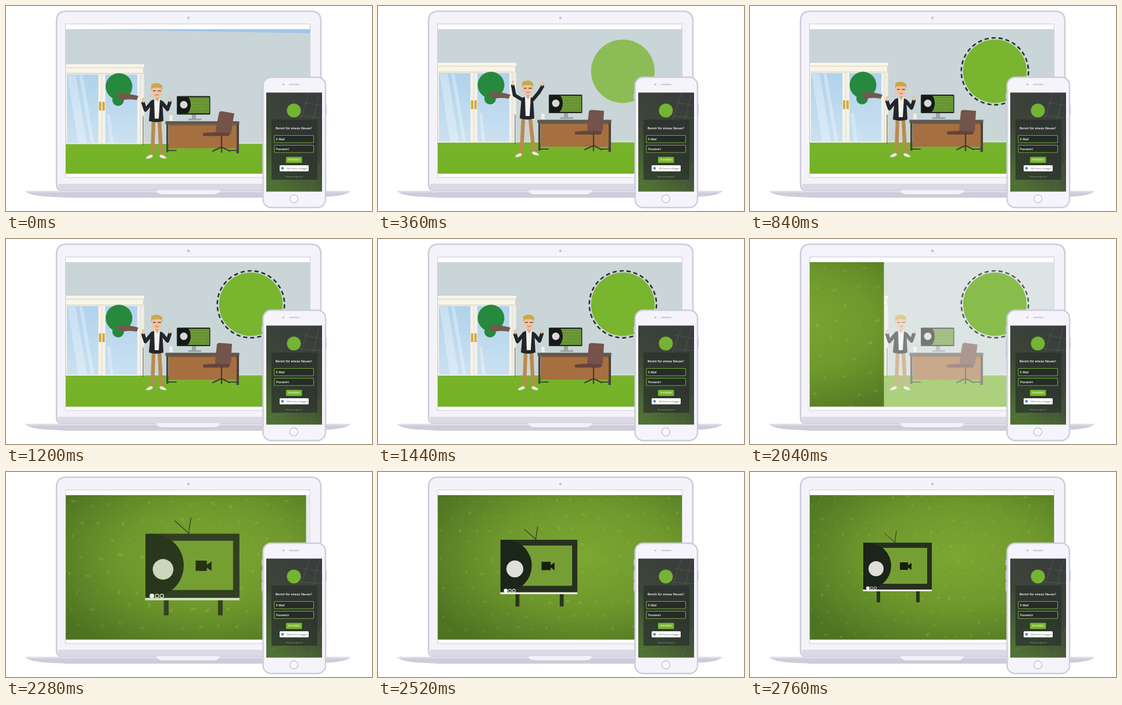
Recreate the animation shown at these times as an HTML page. Size 630 by 354 pixels, loop 2.88 s.

```html
<!DOCTYPE html>
<html lang="de">
<head>
<meta charset="utf-8">
<title>Laptop und Telefon</title>
<style>
html, body { margin: 0; width: 100%; height: 100%; overflow: hidden; background: #fff; }
svg { display: block; width: 630px; height: 354px; }
text { font-family: "Open Sans", "Noto Sans", sans-serif; fill: #fff; }
.line { fill: none; stroke-linecap: round; stroke-linejoin: round; }
</style>
</head>
<body>
<svg viewBox="0 0 630 354">
  <defs>
    <clipPath id="video"><rect x="103" y="40" width="420.5" height="249.5"/></clipPath>
    <clipPath id="tvScreen"><rect x="195" y="122" width="118" height="80"/></clipPath>
    <clipPath id="pcScreen"><rect x="296" y="155" width="54" height="28"/></clipPath>
    <clipPath id="phoneScreen"><rect x="448" y="149.5" width="96" height="171"/></clipPath>
    <radialGradient id="paper" cx=".6" cy=".42" r=".72">
      <stop offset="0" stop-color="#7da732"/><stop offset=".5" stop-color="#6e982c"/><stop offset="1" stop-color="#4e7423"/>
    </radialGradient>
    <linearGradient id="glass" x1="0" y1="0" x2="0" y2="1">
      <stop offset="0" stop-color="#b0d2ec"/><stop offset="1" stop-color="#cbe1f1"/>
    </linearGradient>
    <linearGradient id="floor" x1="0" y1="0" x2="0" y2="1">
      <stop offset="0" stop-color="#77b42b"/><stop offset="1" stop-color="#73b125"/>
    </linearGradient>
    <linearGradient id="photo" x1=".7" y1="0" x2=".3" y2="1">
      <stop offset="0" stop-color="#393d3c"/><stop offset=".5" stop-color="#3d4638"/><stop offset="1" stop-color="#4f7134"/>
    </linearGradient>
  </defs>

  <!-- laptop -->
  <path d="M87 26Q87 9 104 9H525Q542 9 542 26V308Q542 319 531 319H98Q87 319 87 308Z" fill="#f4f3f9" stroke="#cecbdb" stroke-width="2.6"/>
  <circle cx="314" cy="20.5" r="2.2" fill="#c4c1d0"/>
  <rect x="102.5" y="31" width="421" height="265" fill="#fff" stroke="#cbc9d6"/>
  <path d="M90 307H540V318H90Z" fill="#dbd9e4"/>
  <path d="M34 320H592Q586 327 558 329L520 331H106L68 329Q40 327 34 320Z" fill="#cecbdb"/>
  <path d="M34 319H592V322H34Z" fill="#dfdde8"/>
  <path d="M259 318H368Q367 325 358 325H269Q260 325 259 318Z" fill="#f3f2f8"/>

  <g clip-path="url(#video)">
    <rect x="103" y="40" width="421" height="250" fill="#c9d5d7"/>
    <path id="strip" fill="#9fc6ea" d="M103 40H524V47L240 42Z"/>
    <g id="scene">
      <path d="M238 233H524V236H238Z" fill="#d6e0e0"/>
      <rect x="103" y="235.500" width="421" height="55" fill="url(#floor)"/>

      <!-- glass doors -->
      <path d="M103 113H238V236H103Z" fill="#efeee6"/>
      <path d="M105 116H159V234H105ZM171 116H226V234H171Z" fill="url(#glass)"/>
      <path d="M106 117H120L139 234H124ZM126 117H132L152 234H146ZM174 185H179L185 234H179Z" fill="#fff" opacity=".3"/>
      <path d="M159 116H171V235H159ZM226 116H231V235H226Z" fill="#f5f2e8"/>
      <path d="M165 116V235M231 116V235M238 113V236" class="line" stroke="#d5d3c8" stroke-width=".8"/>
      <path d="M101 98H238V104H236V113H101Z" fill="#f8f5e8"/>
      <path d="M103 104H236M103 114H238" class="line" stroke="#d9d3b8"/>
      <path d="M160 163H164V178H160ZM166 163H170V178H166Z" fill="#d6aa43"/>
      <circle cx="194.500" cy="136.500" r="23" fill="#26893d"/>
      <circle cx="193" cy="160" r="10" fill="#26893d"/>
      <path d="M190 150Q207 147 228 153L225 160Q208 157 198 161Z" fill="#75584a"/>

      <!-- desk -->
      <path d="M276 201H279.500V250H276ZM396.500 201H401V252H396.500Z" fill="#49443e"/>
      <path d="M280 202H397V243H280Z" fill="#a66f3f"/>
      <path d="M280 202H397V204H280Z" fill="#855938"/>
      <path d="M274.500 196.500H401.500V202H274.500Z" fill="#5d5850"/>
      <path d="M277 247H293M384 247H398" class="line" stroke="#49443e" stroke-width="2"/>
      <rect x="281" y="186" width="6.500" height="9.500" rx="1" fill="#eef0ec"/>
      <path d="M287 188Q291 190 287 193" class="line" stroke="#b9bfbd"/>
      <path d="M320 184H327V192H336V195H314V192H320Z" fill="#9ba3a4"/>
      <rect x="294" y="153" width="57.500" height="32" rx="1.500" fill="#20251f"/>
      <g clip-path="url(#pcScreen)">
        <path d="M296 155H350V183H296Z" fill="#669434"/>
        <path d="M319 160H346M317 165H348M320 170H344M318 175H347" stroke="#7ba33e" stroke-width="1.400" stroke-dasharray="3 2"/>
        <circle cx="294" cy="168" r="24" fill="#151a16"/>
        <circle cx="306" cy="168" r="6.500" fill="#d5d8d4"/>
      </g>

      <!-- chair -->
      <path id="chair" d="M363 182Q364 179 369 179.500L389 181L387 215Q379 222 369 219Q360 219 360 212Z" fill="#74534b"/>
      <path d="M338 217.500Q355 214 386 217L383 222H340Z" fill="#66443a"/>
      <path d="M371 221V246M356 248L371 241L385 248M371 241V250" class="line" stroke="#453b36" stroke-width="2.200"/>

      <!-- man -->
      <g transform="translate(0 -2)">
        <path d="M236 190V240" class="line" stroke="#4b4e4c"/>
        <g id="legs" class="line" stroke="#b98b50" stroke-width="6.500" style="stroke-linecap:butt"><path/><path/></g>
        <g id="shoes" fill="#f0ebdf" stroke="#c9c3ae" stroke-width=".5"><path d="M-7 5Q-7 1 2 -2L5 0Q4 5-7 5Z"/><path d="M7 5Q7 1-2-2L-5 0Q-4 5 7 5Z"/></g>
        <g id="body">
          <path d="M249 163Q258 158 269 163L271 198Q260 202 246 198Z" fill="#22252a"/>
          <path d="M255 160H265L263 194H256Z" fill="#f2f2ef"/>
          <path d="M257 153H263V161L260 165L257 161Z" fill="#dfae88"/>
          <path d="M251 139H268V149Q267 157 260 158Q252 157 251 149Z" fill="#efc3a0"/>
          <path d="M250 146V136Q254 132 263 133L269 137V146L267 141Q258 140 252 141Z" fill="#cda646"/>
          <path d="M253 146H258M261 146H267" stroke="#674f3c" stroke-width="1.300"/>
          <path d="M257 153H263" stroke="#ad5f4e"/>
        </g>
        <g id="arms" class="line" stroke="#22252a" stroke-width="6"><path/><path/></g>
        <g id="hands" class="line" stroke="#ecc09c" stroke-width="3"><path/><path/></g>
      </g>
    </g>

    <rect id="haze" x="103" y="40" width="421" height="250" fill="#f8f8f5"/>

    <!-- badge -->
    <circle id="badge" cx="421.500" cy="112.800" r="54.700" fill="#79b52f"/>
    <circle id="ring" cx="421.500" cy="112.800" r="57.800" fill="none" stroke="#2b302b" stroke-width="2.600" stroke-dasharray="7.100 5"/>

    <!-- wallpaper and television -->
    <g id="panel" clip-path="url(#video)">
      <rect x="103" y="40" width="421" height="250" fill="url(#paper)"/>
      <g id="specks" fill="#b4d162"></g>
    </g>
    <g id="tv">
      <path d="M250 122L232 106M249 122L252 102" class="line" stroke="#27341d" stroke-width="1"/>
      <path d="M218 205H224V225H218ZM286 205H292V225H286Z" fill="#28361f"/>
      <path d="M195 122H313V203H195Z" fill="#263020"/>
      <path d="M205 131H305V193H205Z" fill="#759f34"/>
      <g clip-path="url(#tvScreen)"><circle cx="203" cy="162" r="40" fill="#1c251a"/></g>
      <circle cx="217" cy="167" r="13" fill="#dce0d6"/>
      <path d="M258 156H272V161L278 157V169L272 165V169H258Z" fill="#16200f"/>
      <path d="M194.500 203H313V206H194.500Z" fill="#eef0e6"/>
      <circle cx="203" cy="200.500" r="3" fill="#fff"/>
      <g fill="none" stroke="#e5e9dc"><circle cx="209.500" cy="200.500" r="2.200"/><circle cx="215.500" cy="200.500" r="2.200"/></g>
    </g>
  </g>

  <!-- phone -->
  <path d="M441 152V160M441 171V186M441 190V205M551 171V187" class="line" stroke="#cac8d8" stroke-width="2"/>
  <rect x="442.500" y="123" width="107.500" height="225" rx="14" fill="#f5f4fa" stroke="#cecbdb" stroke-width="2.400"/>
  <path d="M488 135.500H504" class="line" stroke="#c8c5d4" stroke-width="2.200"/>
  <circle cx="477.500" cy="135.500" r="1.800" fill="#c8c5d4"/>
  <circle cx="495.500" cy="333" r="7" fill="#f9f8fd" stroke="#c8c5d4" stroke-width="1.500"/>
  <g clip-path="url(#phoneScreen)">
    <rect x="448" y="149" width="96" height="172" fill="url(#photo)"/>
    <path d="M523 149L506 198M544 172L510 166M544 193L508 190M539 153L528 198M448 308L486 300M544 268L522 320" class="line" stroke="#869085" stroke-width="1" opacity=".25"/>
    <rect x="457" y="196" width="79" height="104" rx="2" fill="#292e2b" opacity=".68"/>
  </g>
  <circle cx="495.500" cy="180.500" r="12" fill="#74b432"/>
  <g text-anchor="middle">
    <text x="495.500" y="213" font-size="5.500" font-weight="600">Bereit für etwas Neues?</text>
    <rect x="482" y="260.500" width="27.500" height="10.500" rx="1.500" fill="#78b62d"/>
    <text x="495.700" y="267.300" font-size="4.400">Anmelden</text>
    <rect x="471" y="275" width="50" height="10.500" rx="1.500" fill="#fff"/>
    <text x="501.500" y="281.800" font-size="3.700" style="fill:#555">Mit Fenolo einloggen</text>
    <text x="496" y="296.300" font-size="3.200" style="fill:#9ba396">Passwort vergessen?</text>
  </g>
  <circle cx="476" cy="280.200" r="2.300" fill="#5483cf"/>
  <g fill="#262b27" stroke="#74a936" stroke-width="1.100">
    <rect x="462" y="223.500" width="67.500" height="12.500" rx="1"/>
    <rect x="462" y="240.500" width="67.500" height="12.500" rx="1"/>
  </g>
  <g font-size="5" font-weight="600">
    <text x="465" y="231.800">E-Mail</text>
    <text x="465" y="248.800">Passwort</text>
  </g>
</svg>
<script>
const LOOP = 2880, STEP = 120;
const $ = id => document.getElementById(id);
const set = (el, name, value) => el.setAttribute(name, value);
const mix = (a, b, p) => a + (b - a) * p;

function at(t, ...keys) {
  if (t <= keys[0][0]) return keys[0][1];
  for (let i = 1; i < keys.length; i++) {
    const [t0, a] = keys[i - 1], [t1, b] = keys[i];
    if (t <= t1) return mix(a, b, (t - t0) / (t1 - t0));
  }
  return keys[keys.length - 1][1];
}

// shoulder, elbow, wrist as x, y pairs: shrugging and cheering
const arms = [
  [[250, 167, 240, 179, 236, 167], [247, 163, 235, 156, 232, 140]],
  [[269, 167, 278, 178, 282, 166], [267, 163, 277, 151, 283, 141]]
];
const legs = [
  [[254, 197, 252, 256], [250, 196, 247, 256]],
  [[264, 197, 267, 256], [262, 196, 268, 253]]
];
const blend = ([a, b], p) => a.map((v, i) => mix(v, b[i], p));

function drawMan(up) {
  arms.forEach((pair, i) => {
    const [sx, sy, ex, ey, hx, hy] = blend(pair, up), side = i ? 1 : -1;
    set($("arms").children[i], "d", `M${sx} ${sy}L${ex} ${ey}L${hx} ${hy}`);
    set($("hands").children[i], "d", `M${hx} ${hy - 2}l${side} -4m0 0l${-2 * side} -2`);
  });
  legs.forEach((pair, i) => {
    const [x0, y0, x1, y1] = blend(pair, up);
    set($("legs").children[i], "d", `M${x0} ${y0}L${x1} ${y1}`);
    set($("shoes").children[i], "transform", `translate(${x1 + (i ? 2 : -4)} ${y1 + 2})`);
  });
  set($("body"), "transform", `translate(${-2 * up} ${-2 * up})`);
}

function makeSpecks() {
  let seed = 17, out = "";
  const rnd = () => (seed = seed * 16807 % 2147483647) / 2147483647;
  for (let row = 0; row < 13; row++) {
    for (let col = 0; col < 19; col++) {
      const x = 92 + col * 25 + row % 2 * 12 + rnd() * 8, y = 36 + row * 22 + rnd() * 8;
      out += `<ellipse rx="${1.5 + rnd() * 2}" ry="1.5" opacity="${.06 + rnd() * .2}" transform="translate(${x} ${y}) rotate(${rnd() * 180})"/>`;
    }
  }
  $("specks").innerHTML = out;
}

function draw(t) {
  drawMan(at(t, [0, 0], [240, .8], [360, 1], [480, .8], [720, 0]));
  set($("scene"), "transform", `translate(0 ${at(t, [0, 2.5], [240, 0])})`);
  set($("strip"), "opacity", t < STEP ? 1 : 0);
  set($("badge"), "opacity", at(t, [120, 0], [360, .76], [480, .9], [600, 1], [1800, 1], [2040, .84]));
  set($("ring"), "opacity", at(t, [480, 0], [720, 1], [1800, 1], [2040, .75]));
  set($("chair"), "transform", `rotate(${at(t, [0, 6], [240, 0], [1800, 0], [2040, 4])} 371 219)`);
  set($("haze"), "opacity", at(t, [1800, 0], [2040, .42], [2280, .65]));

  const edge = at(t, [1800, 103], [1920, 112], [2040, 231], [2160, 395], [2280, 517], [2400, 524]);
  set($("panel"), "transform", `translate(${edge - 524} 0)`);
  set($("panel"), "visibility", t < 1920 ? "hidden" : "visible");

  const zoom = at(t, [2280, 1.37], [2400, 1.23], [2520, 1.12], [2640, 1.04], [2760, 1]);
  const x = at(t, [2040, 10], [2160, 199], [2280, 321], [2400, 298], [2520, 277], [2640, 262], [2760, 254]);
  set($("specks"), "transform", `translate(313 164) scale(${zoom}) translate(-313 -164)`);
  set($("tv"), "transform", `translate(${x} 164) scale(${zoom}) translate(-254 -164)`);
  set($("tv"), "opacity", at(t, [2160, .75], [2280, .85], [2520, 1]));
  set($("tv"), "visibility", t < 2160 ? "hidden" : "visible");
}

makeSpecks();
draw(0);
const start = performance.now();
function tick() {
  const t = (performance.now() - start) % LOOP;
  draw(Math.floor(t / STEP) * STEP);
  requestAnimationFrame(tick);
}
requestAnimationFrame(tick);
</script>
</body>
</html>
```
